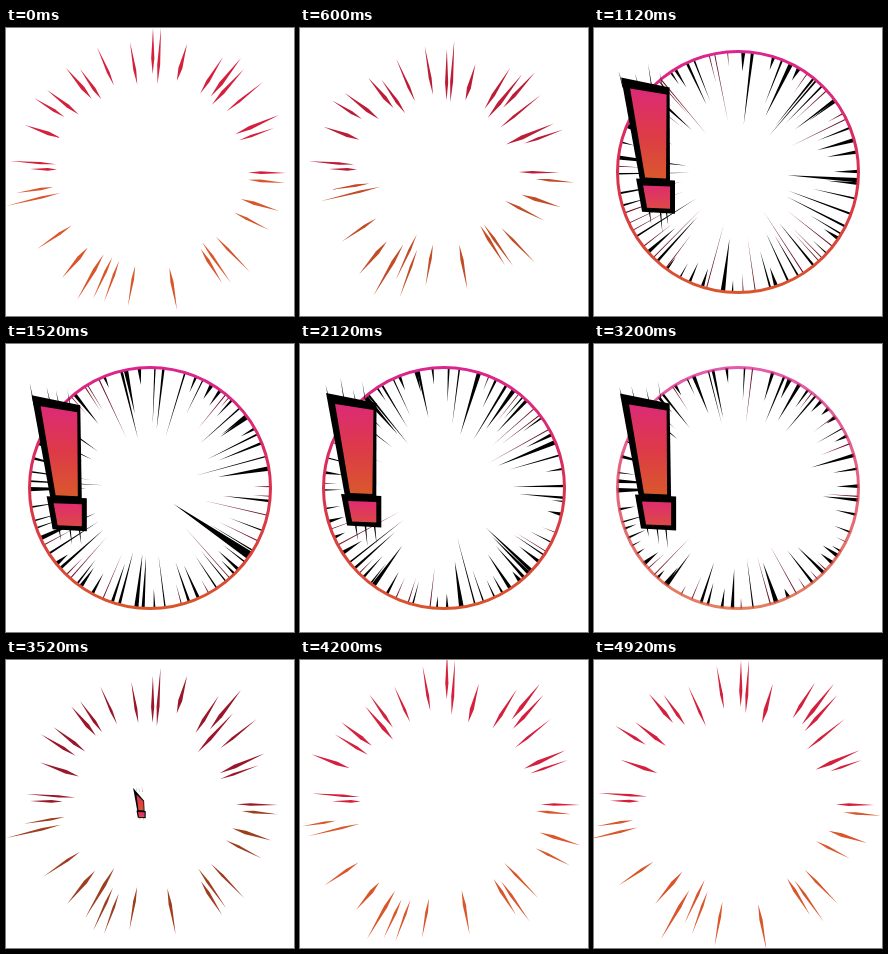
Animation, 288 px wide and 288 px high, one loop 5120 ms. Source, as an HTML page with a canvas:

```html
<!DOCTYPE html>
<html lang="en">
<head>
<meta charset="utf-8">
<title>Exclamation burst</title>
<style>
  html, body { margin: 0; width: 100%; height: 100%; overflow: hidden; background: #fff; }
  canvas { display: block; width: 288px; height: 288px; }
</style>
</head>
<body>
<canvas id="stage" width="288" height="288"></canvas>
<script>
const ctx = document.getElementById('stage').getContext('2d');
const LOOP = 5120, FPS = 12, LAST = 59, TAU = Math.PI * 2;
const MID = 144, RING = 120.5;

// Burst rays: outer end x, y and length; each points at the middle.
const RAYS = [
  [124, 14, 43], [147, 0, 46], [155, 0, 56], [181, 16, 38], [217, 29, 43],
  [235, 30, 49], [238, 41, 48], [257, 54, 47], [273, 87, 48], [268, 100, 37],
  [280, 145, 38], [279, 155, 37], [273, 183, 40], [263, 202, 39], [244, 244, 49],
  [225, 255, 50], [216, 255, 40], [171, 282, 43], [122, 278, 41], [98, 274, 44],
  [87, 271, 46], [71, 272, 53], [56, 250, 40], [31, 221, 42], [0, 178, 56],
  [10, 165, 38], [24, 141, 27], [4, 133, 46], [19, 97, 38], [28, 70, 36],
  [41, 62, 40], [60, 40, 40], [74, 41, 37], [91, 19, 42]
];

const clamp = v => Math.max(0, Math.min(1, v));
const rnd = (a, b) => {
  const v = Math.sin(a * 12.9898 + b * 78.233) * 43758.5453;
  return v - Math.floor(v);
};
// Rises from step a to b, falls from step c to d.
const hold = (k, a, b, c, d) => Math.min(clamp((k - a) / (b - a)), clamp((d - k) / (d - c)));

function poly(points, fill) {
  ctx.beginPath();
  points.forEach(([x, y]) => ctx.lineTo(x, y));
  ctx.closePath();
  ctx.fillStyle = fill;
  ctx.fill();
}

function blend(y0, y1, ...colours) {
  const g = ctx.createLinearGradient(0, y0, 0, y1);
  colours.forEach((c, i) => g.addColorStop(i / (colours.length - 1), c));
  return g;
}

const shade = (rgb, f) => `rgb(${rgb.map(v => Math.round(v * f)).join(',')})`;

function drawBurst(k) {
  const light = 1 - (k < 20 ? clamp((k - 6.6) / 3.6) : clamp((43.1 - k) / 4));
  const pull = k < 20 ? 16 * clamp(k / 7) + 5 * Math.max(0, k - 7)
                      : 20 * clamp((44 - k) / 4);
  RAYS.forEach(([x, y, len], i) => {
    const dx = 146 - x, dy = 143 - y, d = Math.hypot(dx, dy);
    const ux = dx / d, uy = dy / d;
    const jump = k ? Math.round(rnd(i + 1, k) * 3 - 1.5) * 8 : 0;
    const grow = k ? (rnd(i + 50, k) - 0.5) * 8 : 0;
    const from = pull * 0.8 + jump, to = len + pull + jump + grow;
    const peak = from + (to - from) * 0.66;
    const w = 1.2 + 0.9 * rnd(i, 3) * (Math.abs(ux) > 0.97 ? 0.2 : 1);
    const at = (r, s) => [x + ux * r - uy * s, y + uy * r + ux * s];
    poly([at(from, 0), at(peak, w), at(to, 0), at(peak, -w)],
      shade(y < 150 ? [212, 32, 60] : [217, 86, 43], light));
  });
}

function spike(angle, tip, w, fill) {
  const c = Math.cos(angle), s = Math.sin(angle);
  const at = (r, o) => [MID + c * r - s * o, MID + s * r + c * o];
  poly([at(tip, 0), at(RING, w), at(RING, -w)], fill);
}

function drawSpeedLines(k, reach) {
  const n = 76;
  for (let i = 0; i < n; i++) {
    const a = (i + rnd(i, 11) * 0.9) / n * TAU;
    const angle = a + 0.07 * Math.sin(4 * a) + (rnd(i, k + 7) - 0.5) * 0.025;
    const depth = 12 + 62 * Math.pow(rnd(i, k + 90), 1.4);
    const w = 0.5 + 1.9 * Math.pow(rnd(i, k + 200), 2);
    spike(angle, RING - depth * reach, w, w < 0.65 ? '#6a1428' : '#000');
  }
  if (k % 9 === 0) spike(0.595, RING - 92 * reach, 4.2, '#000');
}

function drawRing(alpha) {
  ctx.globalAlpha = alpha;
  ctx.beginPath();
  ctx.arc(MID, MID, RING, 0, TAU);
  ctx.lineWidth = 3;
  ctx.strokeStyle = blend(22, 266, '#dc2490', '#d9304f', '#d9552b');
  ctx.stroke();
  ctx.globalAlpha = 1;
}

function drawMark(k, size) {
  const fold = 1 - size;
  const wob = n => (rnd(n, k + 31) - 0.5) * 3;
  ctx.save();
  ctx.translate(156, 150);
  ctx.scale(size, size);
  ctx.translate(-156 + wob(1), -150 + wob(2));

  for (let i = 0; i < 4; i++) {
    const x = 30 + i * 12 + wob(i + 10) * 2, h = 6 + 19 * rnd(i, k + 60);
    const top = 54 + i * 2.5;
    poly([[x - 3, top - h], [x + 1, top + 6], [x + 2.2, top + 6]], '#000');
  }
  for (let i = 0; i < 3; i++) {
    const x = 54 + i * 10 + wob(i + 20) * 2, h = 5 + 15 * rnd(i, k + 70);
    poly([[x - 1, 182], [x + 0.6, 182], [x + 2, 186 + h]], '#000');
  }

  const rx = wob(3), by = wob(4), bx = wob(5);
  poly([[27, 50], [76 + rx, 60 + 60 * fold], [77 + bx, 155], [46, 154]], '#000');
  poly([[36 + 8 * fold, 61 + 25 * fold], [73 + rx, 67 + 55 * fold], [73 + bx, 151], [51, 150]],
    blend(60, 152, '#dc2a78', '#dd3a48', '#d9592b'));
  poly([[42, 151], [82 + bx, 153], [82 + bx, 186 + by], [48, 184 + by]], '#000');
  poly([[49, 158], [77 + bx, 159], [77 + bx, 181 + by], [53, 180 + by]],
    blend(158, 182, '#df2c70', '#dc4a45'));
  ctx.restore();
}

function draw(ms) {
  // Drawings are held at 12 per second on a 40 ms clock.
  const tick = Math.floor((ms % LOOP) / 40);
  const k = Math.min(LAST, Math.floor(tick * 40 * FPS / 1000 + 1e-6));
  ctx.fillStyle = '#fff';
  ctx.fillRect(0, 0, 288, 288);

  if (k < 10 || k > 39) drawBurst(k);
  else drawSpeedLines(k, hold(k, 8, 12, 37, 41));

  const ring = hold(k, 8, 12, 37, 41);
  if (ring) drawRing(ring);
  const size = hold(k, 7, 12, 38.5, 43);
  if (size) drawMark(k, size);
}

const start = performance.now();
function loop() {
  draw(performance.now() - start);
  requestAnimationFrame(loop);
}
loop();
</script>
</body>
</html>
```
